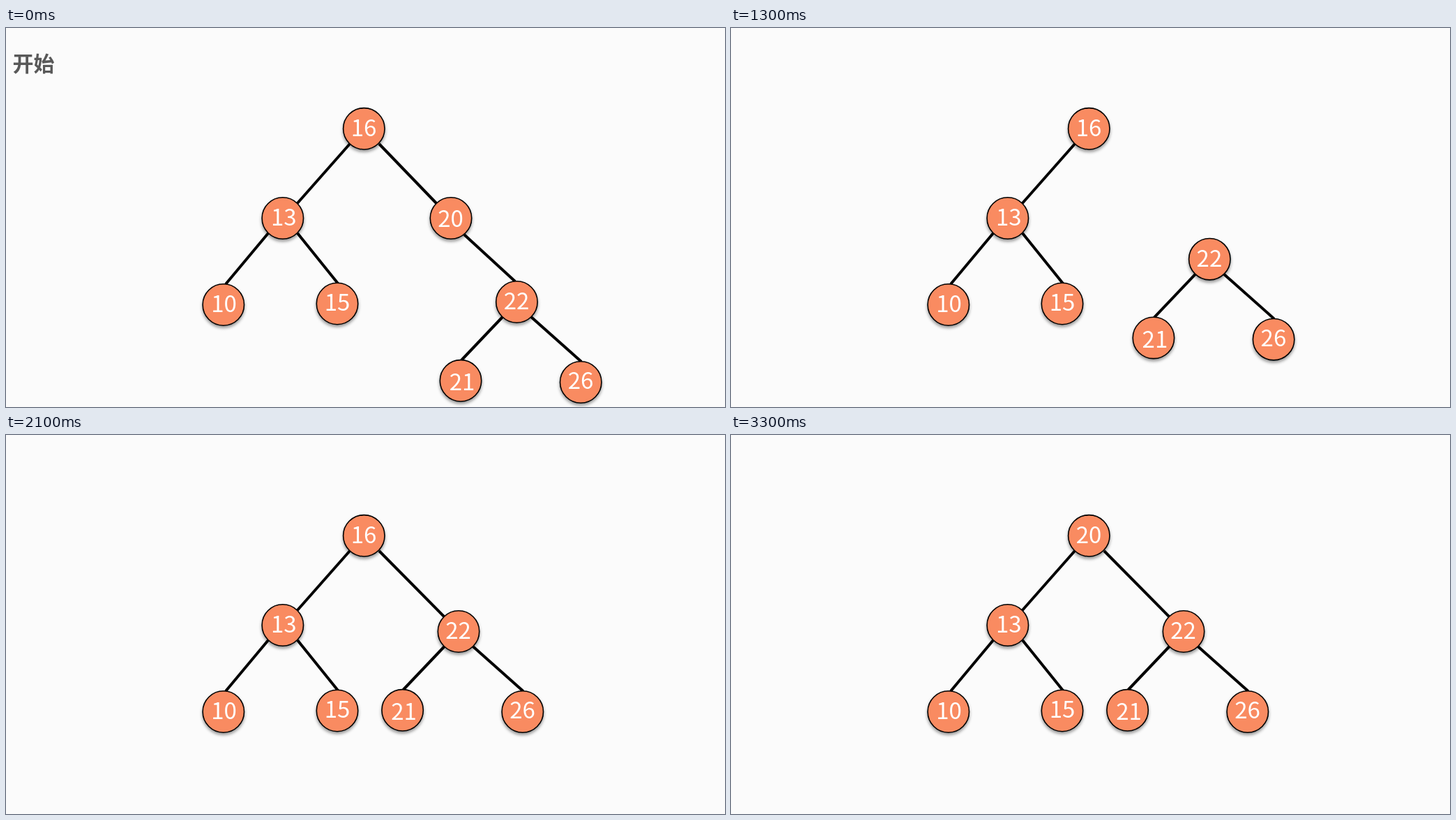
These frames come from a looping animation (1031 px wide and 543 px high, 3500 ms). An HTML page:

```html
<!DOCTYPE html>
<html lang="zh-CN">
<head>
<meta charset="utf-8">
<title>二叉树删除节点</title>
<style>
html, body { margin: 0; width: 100%; height: 100%; overflow: hidden; background: #fbfbfb; }
svg { display: block; width: 1031px; height: 543px; }
text { font-family: "Noto Sans CJK SC", "Noto Sans CJK JP", "Noto Sans CJK", sans-serif; }
.label { font-size: 33px; font-weight: 500; fill: #fff; text-anchor: middle; }
#title { font-size: 30px; font-weight: 700; fill: #595959; }
line { stroke: #000; stroke-width: 4; }
circle { fill: #f98b61; stroke: #000; stroke-width: 1.6; filter: drop-shadow(0 3px 2px rgba(0, 0, 0, .4)); }
</style>
</head>
<body>
<svg viewBox="0 0 1031 543">
  <text id="title" x="9.5" y="62">开始</text>
  <g id="newEdge"></g>
  <g id="removed"></g>
  <g id="fixed"></g>
  <g id="subtree"></g>
  <text id="oldRoot" class="label" x="513" y="155">16</text>
  <text id="newRoot" class="label" x="513" y="155">20</text>
</svg>
<script>
const LOOP = 3500, STEP = 100, DURATION = 1067;
const $ = id => document.getElementById(id);
const clamp = v => Math.min(1, Math.max(0, v));

const edge = (x1, y1, x2, y2) => `<line x1="${x1}" y1="${y1}" x2="${x2}" y2="${y2}"/>`;
const disc = (x, y) => `<circle cx="${x}" cy="${y}" r="29.7"/>`;
// dx, dy: offset of the label's centre from the disc's centre
const node = (n, x, y, dx, dy) =>
  disc(x, y) + `<text class="label" x="${x + dx}" y="${y + dy + 12}">${n}</text>`;

$('newEdge').innerHTML = edge(535, 166, 629, 261);
$('removed').innerHTML = edge(535, 166, 617, 251) + edge(657, 296, 730, 363) +
  node(20, 638, 272.5, -.5, .5);
$('fixed').innerHTML = edge(493, 166, 417, 252) + edge(376, 294, 315, 367) +
  edge(418, 294, 476, 366) + disc(513.3, 144.3) +
  node(13, 396.8, 272.5, 1.5, -1.5) + node(10, 311.8, 396.5, .7, -1.5) +
  node(15, 475, 395, 0, -2);
$('subtree').innerHTML = edge(712, 414, 653, 476) + edge(753, 414, 825, 478) +
  node(22, 732.4, 392.5, -.4, -1.5) + node(21, 652, 505.3, 2, 1.7) +
  node(26, 824.2, 507.5, -.2, -2.5);

// cubic-bezier(.25, .1, .25, 1)
function ease(x) {
  if (x <= 0 || x >= 1) return clamp(x);
  const bez = (a, b, s) => 3 * a * s * (1 - s) ** 2 + 3 * b * s * s * (1 - s) + s ** 3;
  let lo = 0, hi = 1;
  for (let i = 0; i < 30; i++) {
    const mid = (lo + hi) / 2;
    if (bez(.25, .25, mid) < x) lo = mid; else hi = mid;
  }
  return bez(.1, 1, lo);
}

// Linear progress of a transition whose first visible step is at `first`
const phase = (t, first) => t < first ? 0 : clamp((t - first + 142) / DURATION);
const fadeOut = x => clamp(1 - x / .32);
const fadeIn = x => clamp((x - .45) / .32);

function draw(now) {
  const t = Math.floor(now % LOOP / STEP) * STEP;
  const move = phase(t, 1100), swap = phase(t, 2300), p = ease(move);
  $('title').style.opacity = t < 800 ? 1 : 0;
  $('removed').style.opacity = fadeOut(move);
  $('newEdge').style.opacity = fadeIn(move);
  $('subtree').setAttribute('transform', `translate(${-83.4 * p} ${-111 * p})`);
  $('oldRoot').style.opacity = fadeOut(swap);
  $('newRoot').style.opacity = fadeIn(swap);
}

const start = performance.now();
(function tick() {
  draw(performance.now() - start);
  requestAnimationFrame(tick);
})();
</script>
</body>
</html>
```
